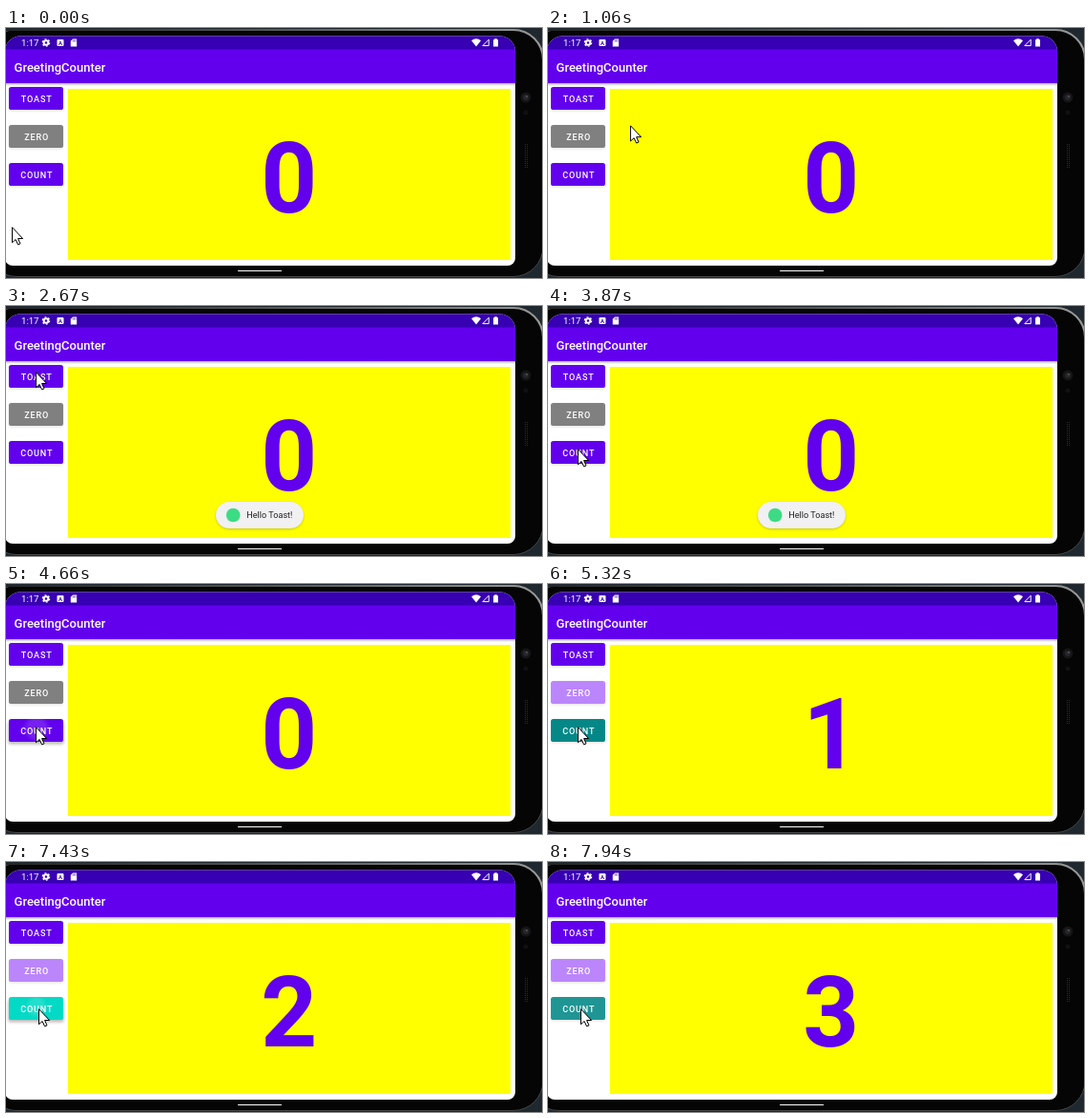
An HTML page for the animation above (8000 ms loop, 562 px wide and 263 px high).

```html
<!DOCTYPE html>
<html lang="en">
<head>
<meta charset="utf-8">
<title>Counter app</title>
<style>
  html, body { margin: 0; width: 100%; height: 100%; overflow: hidden; background: #000; }
  svg { display: block; width: 100vw; height: 100vh; }
  text { font-family: Roboto, sans-serif; }
  .label { font-size: 9.1px; font-weight: 500; letter-spacing: .81px; fill: #fff; text-anchor: middle; }
  #count { font-size: 103px; font-weight: 700; fill: #6200ee; text-anchor: middle; }
</style>
</head>
<body>
<svg viewBox="0 0 562 263">
  <defs>
    <clipPath id="screen"><path d="M-1 24a16 16 0 0 1 16-15.5H518a16 16 0 0 1 16 15.5V242a8 8 0 0 1-8 8H7a8 8 0 0 1-8-8z"/></clipPath>
    <clipPath id="face"><rect width="57" height="24" rx="2.6"/></clipPath>
    <linearGradient id="barShade" x2="0" y2="1">
      <stop stop-color="#000" stop-opacity=".3"/><stop offset="1" stop-color="#000" stop-opacity="0"/>
    </linearGradient>
    <linearGradient id="rim">
      <stop stop-color="#222"/><stop offset=".5" stop-color="#555"/><stop offset="1" stop-color="#999"/>
    </linearGradient>
    <radialGradient id="glow">
      <stop offset=".6" stop-color="#fff"/><stop offset="1" stop-color="#fff" stop-opacity="0"/>
    </radialGradient>
    <filter id="blur" x="-30%" y="-50%" width="160%" height="200%"><feGaussianBlur stdDeviation="1.6"/></filter>
    <pattern id="mesh" width="2" height="2" patternUnits="userSpaceOnUse"><rect width="1" height="1" fill="#2c2c2c"/></pattern>
  </defs>

  <!-- phone body -->
  <rect width="562" height="263" fill="#1f282e"/>
  <rect x="-20" y="1.5" width="583" height="260" rx="31" fill="#050505" stroke="#45484a"/>
  <path d="M-20 2H532a31 31 0 0 1 31 31" fill="none" stroke="url(#rim)" stroke-width="2"/>
  <circle cx="545" cy="73" r="5.5" fill="#151517"/>
  <circle cx="545" cy="73" r="3" fill="#26272b"/>
  <circle cx="546" cy="72" r="1" fill="#50535a"/>
  <circle cx="545" cy="89" r="2.5" fill="#101012"/>
  <rect x="543" y="121" width="5" height="26" fill="url(#mesh)"/>

  <!-- screen -->
  <g clip-path="url(#screen)">
    <rect y="8" width="534" height="242" fill="#fff"/>
    <rect y="8" width="534" height="15" fill="#3700b3"/>
    <rect y="22.5" width="534" height="35.5" fill="#6200ee"/>
    <rect y="58" width="534" height="3" fill="url(#barShade)"/>
    <rect x="65" y="64" width="464" height="180" fill="#ff0"/>
  </g>
  <rect x="243" y="255" width="46" height="1" fill="#fff"/>

  <g fill="#fff">
    <text x="16" y="19" font-size="9.6">1:17</text>
    <circle cx="42" cy="15.5" r="2.3" fill="none" stroke="#fff" stroke-width="2"/>
    <circle cx="42" cy="15.5" r="3.7" fill="none" stroke="#fff" stroke-width="1.2" stroke-dasharray="1.9 1.97"/>
    <rect x="53.5" y="12" width="7" height="7" rx="1"/>
    <text x="57" y="18" font-size="6" font-weight="700" text-anchor="middle" fill="#3700b3">A</text>
    <path d="M70 11.5h4.2v8h-6.4v-5.8z"/>
    <path d="M70.2 12.5v2M71.6 12.5v2M73 12.5v2" stroke="#3700b3" stroke-width=".6"/>
    <path d="M488 13.2q5-4 10 0l-5 6.2z"/>
    <path d="M499.8 18.6h6.4v-6.4z" fill="none" stroke="#fff"/>
    <path d="M512.2 11.2h2.6v1h1.2v7.4h-5v-7.4h1.2z"/>
  </g>
  <text x="8.6" y="46" font-size="13" font-weight="500" fill="#fff">GreetingCounter</text>

  <g id="buttons"></g>
  <text id="count" x="296.8" y="194.4">0</text>

  <g id="toast">
    <rect x="220.5" y="207.5" width="91" height="27" rx="13.5" opacity=".3" filter="url(#blur)"/>
    <rect x="220" y="206" width="92" height="28" rx="14" fill="#f1f0f2"/>
    <circle cx="238.2" cy="220" r="7.3" fill="#3ddc84"/>
    <text x="252.3" y="223.3" font-size="9.1" fill="#222">Hello Toast!</text>
  </g>

  <path id="cursor" d="M.5 .7V16.8l3.6-3.3 2.5 5.4 2.4-1-2.4-5.4h5z" fill="#fff" stroke="#000" stroke-linejoin="round"/>
</svg>

<script>
const LOOP = 8000;
const CAPTURE_STEP = 132.3;   // the pointer is redrawn at this rate
const PRESS_TIME = 800;
const $ = id => document.getElementById(id);

const glides = [
  { from: 300, to: 390, x: 33, y: 158 },
  { from: 510, to: 510, x: -40, y: 0 },      // pointer leaves the stage
  { from: 925, to: 925, x: 209, y: 179 },
  { from: 925, to: 1330, x: 33, y: 69 },
  { from: 2500, to: 2520, x: 31, y: 69 },
  { from: 3380, to: 3840, x: 31, y: 150 },
  { from: 6400, to: 6720, x: 34, y: 154 }
];
const presses = { TOAST: [1870], ZERO: [], COUNT: [4540, 6120, 7430] };
const countTimes = [4780, 6120, 7580];

const colorOf = {
  TOAST: () => '#6200ee',
  ZERO: n => n ? '#bb86fc' : '#808080',
  COUNT: n => !n ? '#6200ee' : n % 2 ? '#018786' : '#03dac5'
};

const ramp = (t, from, to) => Math.min(1, Math.max(0, (t - from) / (to - from || 1)));
const easeOut = p => 1 - (1 - p) ** 3;

function pointerAt(t) {
  const held = Math.floor((t + 20) / CAPTURE_STEP) * CAPTURE_STEP;
  let x = 6, y = 209;
  for (const glide of glides) {
    const p = easeOut(ramp(held, glide.from, glide.to));
    x += (glide.x - x) * p;
    y += (glide.y - y) * p;
  }
  return [x, y];
}

function rippleAt(name, t) {
  const start = presses[name].findLast(at => at <= t) ?? -PRESS_TIME;
  const p = ramp(t, start, start + PRESS_TIME);
  return {
    radius: 12 + 120 * p * p,
    opacity: .13 * (1 - ramp(p, .6, 1)),
    shadow: p < .25 ? .18 : 0
  };
}

const buttons = Object.keys(presses).map((name, i) => {
  const g = document.createElementNS('http://www.w3.org/2000/svg', 'g');
  g.setAttribute('transform', `translate(3 ${62 + 40 * i})`);
  g.innerHTML = `
    <rect y="1" width="57" height="24" rx="2.6" opacity=".12" filter="url(#blur)"/>
    <rect x="-1" y="3" width="59" height="24" rx="3" filter="url(#blur)"/>
    <rect width="57" height="24" rx="2.6"/>
    <g clip-path="url(#face)"><circle cx="29" cy="10" fill="url(#glow)"/></g>
    <text class="label" x="29.2" y="15.8">${name}</text>`;
  $('buttons').append(g);
  const [, lift, face] = g.querySelectorAll('rect');
  return { name, lift, face, ripple: g.querySelector('circle') };
});

function draw(t) {
  const count = countTimes.filter(at => at <= t).length;
  $('count').textContent = count;
  $('toast').setAttribute('opacity', ramp(t, 2010, 2370) - ramp(t, 4150, 4540));
  $('cursor').setAttribute('transform', `translate(${pointerAt(t)})`);
  for (const { name, lift, face, ripple } of buttons) {
    const { radius, opacity, shadow } = rippleAt(name, t);
    face.setAttribute('fill', colorOf[name](count));
    lift.setAttribute('opacity', shadow);
    ripple.setAttribute('r', radius);
    ripple.setAttribute('opacity', opacity);
  }
}

const start = performance.now();
function tick() {
  draw((performance.now() - start) % LOOP);
  requestAnimationFrame(tick);
}
tick();
</script>
</body>
</html>
```
